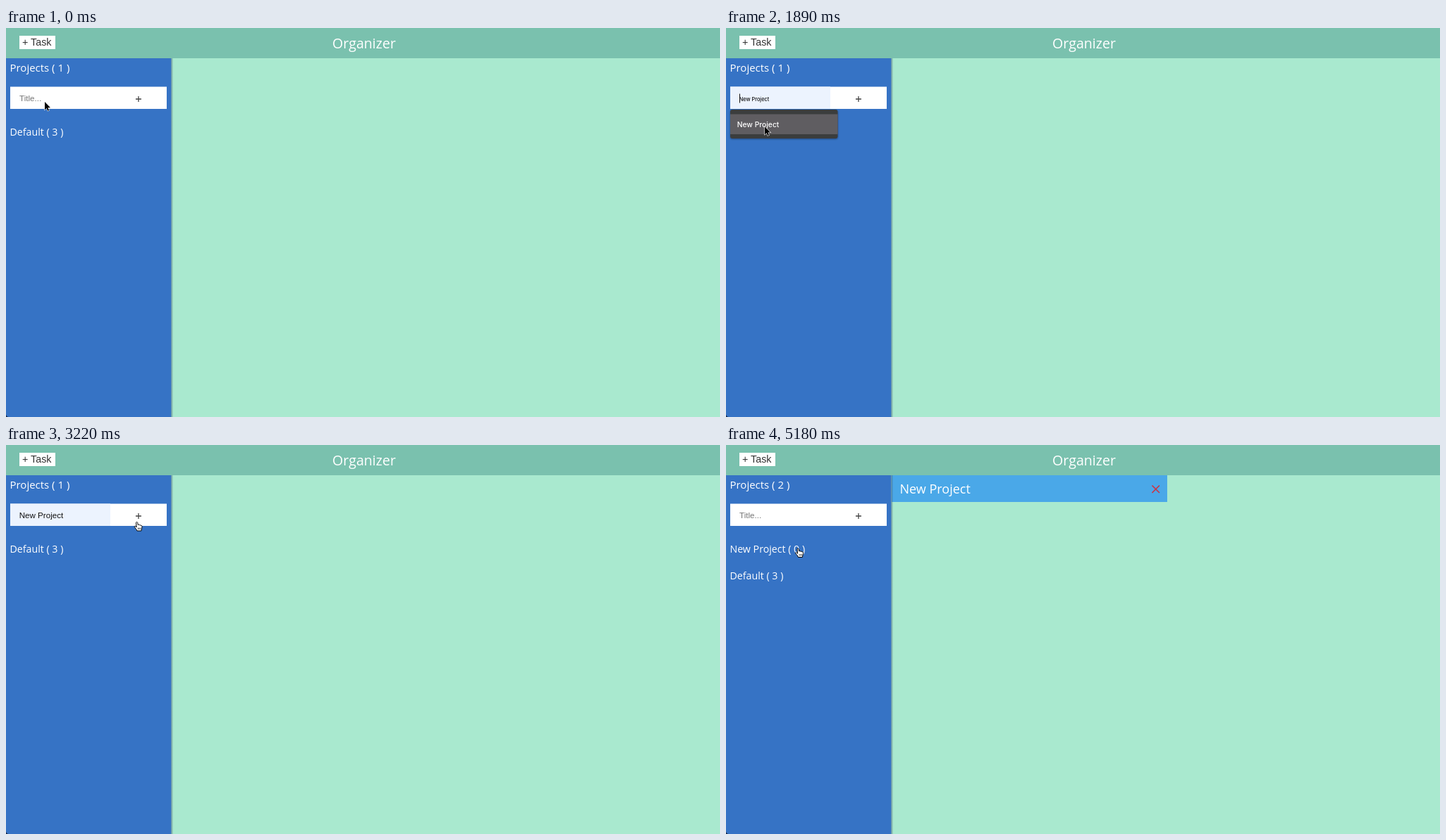
Recreate the animation shown at these times as an HTML page. Size 1013 by 553 pixels, loop 5.25 s.

```html
<!DOCTYPE html>
<html lang="en">
<head>
<meta charset="utf-8">
<title>Organizer</title>
<style>
  html, body { margin: 0; width: 100%; height: 100%; overflow: hidden; background: #a9e9cf; }
  svg { display: block; width: 100%; height: 100%; }
  text { white-space: pre; }
  .ui { font-family: "Open Sans", "Noto Sans", sans-serif; fill: #fff; }
  .form { font-family: "Liberation Sans", Arial, sans-serif; font-size: 11.6px; }
  .sys { font-family: Inter, sans-serif; font-weight: 500; }
  .item { font-size: 14.2px; }
</style>
</head>
<body>
<svg viewBox="0 0 1013 553" xmlns="http://www.w3.org/2000/svg">
  <defs>
    <linearGradient id="edge">
      <stop offset="0" stop-color="#456" stop-opacity=".5"/>
      <stop offset="1" stop-color="#456" stop-opacity="0"/>
    </linearGradient>
    <filter id="shade" x="-10%" y="-20%" width="120%" height="150%">
      <feDropShadow dx="0" dy="1" stdDeviation="1.2" flood-color="#0a1c38" flood-opacity=".55"/>
    </filter>
  </defs>

  <rect width="1013" height="553" fill="#a9e9cf"/>
  <rect width="1013" height="43" fill="#7ac1ae"/>
  <rect x="19" y="11" width="51" height="19" fill="#fff"/>
  <text class="form" x="23" y="25.3" style="font-size:14.3px" fill="#333">+ Task</text>
  <text class="ui" x="508" y="28.5" font-size="19.6" font-weight="500" text-anchor="middle">Organizer</text>

  <g id="panel">
    <rect x="235" y="43" width="391" height="38" fill="#4aa8e8"/>
    <text class="ui" x="246.5" y="69" font-size="18">New Project</text>
    <path d="M604.5 57.5l10.5 10.5m0-10.5l-10.5 10.5" stroke="#cb3545" stroke-width="1.7"/>
  </g>

  <rect y="43" width="234.5" height="510" fill="#3673c5"/>
  <rect x="234.5" y="43" width="3" height="510" fill="url(#edge)"/>
  <path d="M0 549.5V553H3.5Q.5 552.5 0 549.5Z" fill="#10203a"/>
  <text class="ui" id="count" x="5.5" y="62" font-size="15"></text>
  <text class="ui item" id="added" x="5.5" y="152.7">New Project ( 0 )</text>
  <text class="ui item" id="base" x="5.5">Default ( 3 )</text>

  <rect x="6" y="83.5" width="222" height="31.5" fill="#fff"/>
  <rect id="fill" x="6" y="83.5" width="142" height="31.5" fill="#ecf3fe"/>
  <text class="form" id="hint" x="19" y="104" fill="#757575">Title...</text>
  <text class="sys" id="preview" x="18.7" y="104" font-size="7.35" fill="#111">New Project</text>
  <text class="form" id="value" x="18.7" y="104" fill="#111">New Project</text>
  <rect id="caret" y="93.5" width="1" height="13" fill="#111"/>
  <path d="M184 101h8m-4-4v8" stroke="#444" stroke-width="1.3"/>

  <g id="menu">
    <rect x="6" y="116" width="152.5" height="41" rx="3" fill="#3a3d3e" filter="url(#shade)"/>
    <rect id="hover" x="6" y="122.5" width="152.5" height="28.5" fill="#5f5d61"/>
    <text class="sys" x="15.7" y="140.7" font-size="10.3" fill="#fff">New Project</text>
  </g>

  <g id="pointer">
    <path id="arrow" d="M0 0V11.3L2.6 8.9 4.2 12.7 6 11.9 4.4 8.2H8Z"
      fill="#000" stroke="#fff" stroke-width="1.1" paint-order="stroke"/>
    <g id="beam" fill="none">
      <path d="M-2.8-6Q0-6 0-4Q0-6 2.8-6M0-4.5V4.5M-2.8 6Q0 6 0 4Q0 6 2.8 6M-1.4 1.8H1.4" stroke="#222" stroke-width="1.1"/>
    </g>
    <g id="hand" transform="translate(-4.2 -1)" stroke="#000" stroke-linejoin="round">
      <path d="M3.2 1.4C3.2.2 5.2.2 5.4 1.4L6 4.6C6.4 4 7.8 4 8 4.9C8.6 4.4 9.8 4.6 9.9 5.5C10.8 5.1 11.7 5.6 11.7 6.6C11.7 9 11 10 10.6 13H4.6C4.2 11 2.4 9.4 1.2 7.8C.2 6.4 1.8 5.8 2.8 6.8L3.9 7.8Z"
        fill="#fff"/>
      <path d="M6.2 8.6v2.4m1.7-2.4v2.4m1.7-2.4v2.4" stroke-width=".7"/>
    </g>
  </g>
</svg>
<script>
const LOOP = 5250, STEP = 70;
const FOCUS = 700, PICK = 2380, ADD = 3640, OPEN = 4900;

const ease = {
  both: p => p * p * (3 - 2 * p),
  in: p => p * p,
  out: p => p * (2 - p)
};

// time, x, y, easing towards this point
const path = [
  [0, 55, 105],
  [350, 51, 101, 'both'],
  [1120, 51, 101, 'both'],
  [1680, 55, 138, 'both'],
  [2100, 55, 141, 'out'],
  [PICK, 55, 141, 'both'],
  [3080, 185.5, 110, 'both'],
  [ADD, 185.5, 110, 'both'],
  [3990, 176.5, 108.5, 'in'],
  [4620, 102, 147.5, 'out'],
  [LOOP, 102, 147.5, 'both']
];

const el = id => document.getElementById(id);
const show = (id, on) => el(id).setAttribute('visibility', on ? 'inherit' : 'hidden');

function position(t) {
  const i = path.findIndex(k => k[0] > t);
  const [t0, x0, y0] = path[i - 1], [t1, x1, y1, type] = path[i];
  const p = ease[type]((t - t0) / (t1 - t0));
  return [x0 + (x1 - x0) * p, y0 + (y1 - y0) * p];
}

function pointerKind(t, x, y, menu) {
  if (t < 140) return 'arrow';
  if (y > 83 && y < 115) return x < 148 ? 'beam' : 'hand';
  const overItem = y > 138 && y < 157;
  return overItem && !menu ? 'hand' : 'arrow';
}

function draw(t) {
  const [x, y] = position(t);
  const menu = t >= FOCUS && t < PICK;
  const hover = menu && y > 122;
  const picked = t >= PICK && t < ADD;
  const added = t >= ADD;
  const focused = t >= FOCUS && t < ADD;
  const blink = (t - (picked ? PICK : FOCUS)) % 1000 < 500;

  show('menu', menu);
  show('hover', hover);
  show('fill', hover || picked);
  show('hint', !hover && !picked);
  show('preview', hover);
  show('value', picked);
  show('caret', focused && blink);
  el('caret').setAttribute('x', picked ? 82 : 19);

  el('count').textContent = `Projects ( ${added ? 2 : 1} )`;
  show('added', added);
  el('base').setAttribute('y', added ? 191 : 152.7);
  show('panel', t >= OPEN);

  const kind = pointerKind(t, x, y, menu);
  for (const k of ['arrow', 'beam', 'hand']) show(k, k === kind);
  el('pointer').setAttribute('transform', `translate(${x} ${y})`);
}

let start;
function tick(now) {
  start ??= now;
  draw(Math.floor((now - start) % LOOP / STEP) * STEP);
  requestAnimationFrame(tick);
}
draw(0);
requestAnimationFrame(tick);
</script>
</body>
</html>
```
